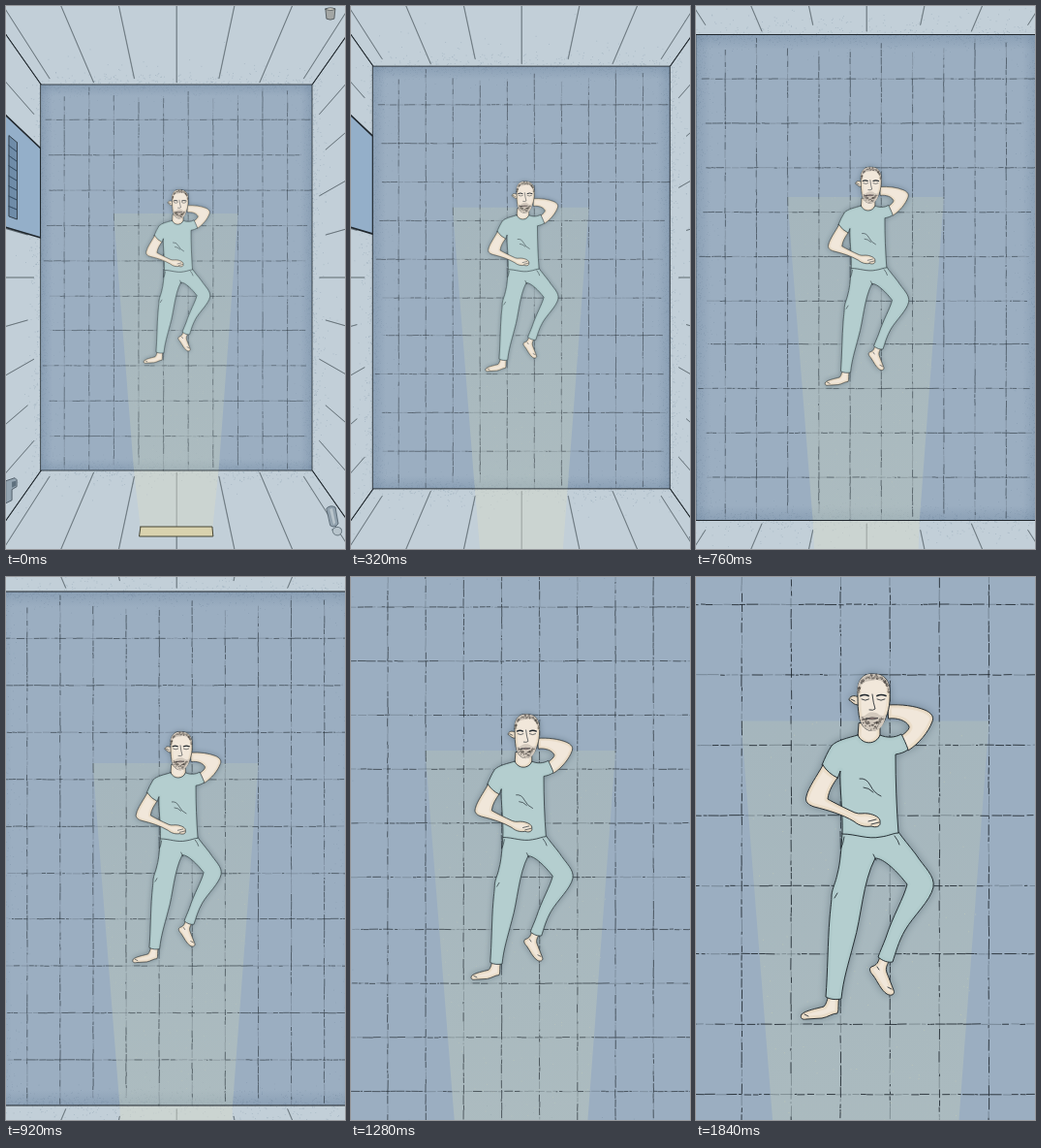
An HTML page with a canvas for the animation above (2.08 s loop, 350 by 560 pixels).

```html
<!DOCTYPE html>
<html lang="en">
<head>
<meta charset="utf-8">
<title>Cell zoom</title>
<style>
html, body { margin: 0; width: 100%; height: 100%; overflow: hidden; background: #c2cfd8; }
canvas { display: block; width: 350px; height: 560px; }
</style>
</head>
<body>
<canvas id="stage" width="350" height="560"></canvas>
<script>
const ctx = document.getElementById('stage').getContext('2d');
const LOOP = 2080, STEP = 40, LAST = 46;
const CX = 176, CY = 280;      // vanishing point
const HW = 140, HH = 199;      // half size of the floor
const SPEED = 0.01083;         // camera descent per step
const END = 1 / (1 - SPEED * LAST);
const INK = '#20272d';

let seed = 71;
function rand() {
  seed = (seed + 0x6D2B79F5) | 0;
  let t = Math.imul(seed ^ (seed >>> 15), 1 | seed);
  t = (t + Math.imul(t ^ (t >>> 7), 61 | t)) ^ t;
  return ((t ^ (t >>> 14)) >>> 0) / 4294967296;
}
const between = (a, b) => a + (b - a) * rand();

// Rough broken pen lines of the floor tiles
const bold = new Path2D(), faint = new Path2D();
function penLine(at, from, to, vertical) {
  let p = from;
  while (p < to) {
    const q = Math.min(to, p + between(.6, 6));
    const a = at + between(-.16, .16), b = a + between(-.1, .1);
    const path = rand() < .62 ? bold : faint;
    if (vertical) { path.moveTo(a, p); path.lineTo(b, q); }
    else { path.moveTo(p, a); path.lineTo(q, b); }
    p = q + between(.4, 1.7);
  }
}
for (let n = -4; n <= 5; n++) {
  const narrowRow = n > 1 ? 1.2 : 0;
  penLine(-13.4 + 25.6 * n, -HH + between(2, 16), HH - between(0, 8), true);
  penLine(-17.1 + 36.4 * n - narrowRow, -HW + between(2, 14), HW - between(0, 12), false);
}

// Stippled shade along the floor edges
const stipple = new Path2D();
for (let i = 0; i < 3000; i++) {
  const d = Math.min(26, -Math.log(1 - rand()) * 4.5);
  const side = rand() < .5 ? -1 : 1;
  if (rand() < .58) stipple.rect(side * (HW - d), between(-HH, HH), .5, .5);
  else stipple.rect(between(-HW, HW), side * (HH - d), .5, .5);
}

// Dust in the light
const dust = new Path2D();
for (let i = 0; i < 150; i++) {
  const v = rand(), half = 64 - 20 * v;
  dust.rect(between(-half, half), -66 + 265 * v, .5, .5);
}

// Grain on the walls, close to the floor
const grain = Array.from({ length: 1300 }, () => {
  const side = rand() < .5 ? -1 : 1, h = -Math.log(1 - rand()) * .03;
  return rand() < .6 ? [side * HW, between(-HH, HH), h] : [between(-HW, HW), side * HH, h];
});

// The sleeper
const P = d => new Path2D(d);
const SKIN = '#f1e7da', CLOTH = '#b4cecf';
const body = [
  [SKIN, P('M198 132C212 131 226 133 236 137C243 140 246 144 244 149C240 160 230 172 219 179L206 168C213 163 221 158 220 154C217 148 208 145 199 146Z')],
  [SKIN, P('M137 431C135 438 134 441 132 443C125 445 113 447 109 451C107 455 110 457 114 456L130 455C136 454 141 450 146 450C148 446 146 440 148 433Z')],
  [SKIN, P('M190 391C188 398 187 400 181 402C178 404 180 408 183 411C188 418 191 426 197 430C202 433 206 430 204 426L197 408C195 403 198 399 200 395Z')],
  [CLOTH, P('M151 264C150 280 149 295 146 306C144 316 141 320 140 328C140 334 139 340 138 352C136 376 136 408 134 433C139 436 145 436 150 435C152 415 157 400 163 377C171 350 172 315 185 290C194 290 208 304 218 317C215 330 203 350 196 372C193 380 190 386 188 392C193 396 198 398 203 397C206 388 209 376 216 364C224 350 242 334 245 320C247 308 236 300 227 286C220 277 214 270 209 263Z')],
  [SKIN, P('M168 151L167 165C173 174 184 174 190 164L190 151Z')],
  [CLOTH, P('M167 163C157 166 146 168 140 174C136 180 133 187 130 194C135 201 140 205 146 208L149 200C148 216 152 244 151 265C165 265 177 271 191 268C199 267 204 264 209 264C207 238 206 210 206 183C211 182 215 181 219 178C217 172 214 166 212 162C205 166 197 166 190 163C186 173 172 174 167 163Z')],
  [SKIN, P('M131 194C125 205 116 217 114 226C112 232 116 235 122 237C138 241 151 245 163 252C169 257 175 258 181 257C186 259 191 257 190 253C191 248 184 245 178 244C173 243 169 245 164 243C153 238 143 233 136 229C137 220 142 213 146 207Q137 203 131 194Z')],
  [SKIN, P('M168 124C163 121 158 123 158 127C161 128 162 132 168 132Z')],
  [SKIN, P('M167 119C166 105 174 99 183 100C195 100 200 107 200 119C201 131 198 143 193 151C188 160 177 161 172 153C167 146 167 132 167 119Z')]
];
const silhouette = new Path2D();
body.forEach(([, p]) => silhouette.addPath(p));
const hair = P('M167 122C165 107 173 99 182 100C194 99 201 107 200 122L197 113C195 107 190 107 186 106C180 108 172 106 169 114Z');
const beard = P('M169 143C172 145 174 143 177 141C180 139 186 139 189 142C192 144 195 143 196 141C196 150 190 159 183 159C174 159 169 150 169 143Z');
const brows = P('M170 122.5Q174 120.5 178 122.5M187 122.5Q191 120.5 196 122.5');
const face = P('M171 126Q175 128.5 178.5 126M187 126Q191 128.5 195 126M182 121Q183 130 185 136Q183 138 179 137M160 126L164 128');
const mouth = P('M176 146Q181 144 188 145.5Q183 148 176 146Z');
const folds = P('M169 208Q176 207 180 215T191 226M173 217Q178 217 183 222M153 268Q152 275 150 279M205 267Q209 272 210 276M183 286L186 292M178 252L186 250M181 255L189 253M112 451L116 453M198 423L202 425M146 326L143 331M187 402L189 405');
const curls = new Path2D();
function curl(x, y, r) {
  curls.moveTo(x + r, y);
  curls.arc(x, y, r, 0, between(3, 6));
}
for (let i = 0; i < 46; i++) {
  const a = between(3.1, 6.3);
  curl(183.5 + 15.5 * Math.cos(a), 119 + between(14, 19) * Math.sin(a), between(.5, 1.2));
}
for (let i = 0; i < 55; i++) {
  const a = between(.1, 3.04);
  curl(182.5 + between(6, 12) * Math.cos(a), 144 + between(6, 14) * Math.sin(a), between(.3, .7));
}

function fill(path, color) { ctx.fillStyle = color; ctx.fill(path); }
function stroke(path, color, width) {
  ctx.strokeStyle = color;
  ctx.lineWidth = width;
  ctx.stroke(path);
}

function softRim(path, color) {
  ctx.save();
  ctx.clip(path);
  stroke(path, color, 7);
  stroke(path, color, 3.5);
  ctx.restore();
}

function drawMan(scale) {
  ctx.save();
  ctx.scale(1 / END, 1 / END);
  ctx.translate(-CX, -CY);
  ctx.save();
  ctx.shadowColor = 'rgba(60,80,92,.5)';
  ctx.shadowBlur = 10 * scale / END;
  fill(silhouette, CLOTH);
  ctx.restore();
  for (const [color, path] of body) {
    fill(path, color);
    softRim(path, color === SKIN ? 'rgba(214,192,150,.22)' : 'rgba(160,190,190,.2)');
    stroke(path, INK, .95);
  }
  fill(hair, '#cdc4b9');
  fill(beard, '#d3c9bd');
  stroke(curls, 'rgba(50,46,44,.8)', .5);
  fill(mouth, '#a98d87');
  stroke(mouth, INK, .6);
  stroke(brows, INK, 1.7);
  stroke(face, INK, .85);
  stroke(folds, INK, .85);
  ctx.restore();
}

function edgeShade(x0, y0, x1, y1) {
  const g = ctx.createLinearGradient(x0, y0, x1, y1);
  g.addColorStop(0, 'rgba(105,130,156,.32)');
  g.addColorStop(1, 'rgba(105,130,156,0)');
  ctx.fillStyle = g;
  ctx.fillRect(-HW, -HH, 2 * HW, 2 * HH);
}

function drawFloor(scale) {
  ctx.save();
  ctx.translate(CX, CY);
  ctx.scale(scale, scale);
  ctx.fillStyle = '#9baec1';
  ctx.fillRect(-HW, -HH, 2 * HW, 2 * HH);
  edgeShade(-HW, 0, -HW + 12, 0);
  edgeShade(HW, 0, HW - 12, 0);
  edgeShade(0, -HH, 0, -HH + 12);
  edgeShade(0, HH, 0, HH - 12);
  fill(stipple, 'rgba(78,102,128,.32)');
  const light = ctx.createLinearGradient(0, -66, 0, HH);
  light.addColorStop(0, 'rgba(188,200,180,.3)');
  light.addColorStop(1, 'rgba(198,208,190,.4)');
  fill(P('M-65-66H63.5L43.5 199H-44Z'), light);
  fill(dust, 'rgba(214,215,180,.38)');
  stroke(bold, 'rgba(28,36,43,.85)', .5);
  stroke(faint, 'rgba(28,36,43,.4)', .36);
  ctx.strokeStyle = INK;
  ctx.lineWidth = .8;
  ctx.strokeRect(-HW, -HH, 2 * HW, 2 * HH);
  drawMan(scale);
  ctx.restore();
}

// Walls: x, y are floor units from the centre, h is height above the floor
function drawWalls(depth) {
  const zoom = h => 1 / Math.max(.12, depth - h);
  const at = (x, y, h) => [CX + x * zoom(h), CY + y * zoom(h)];
  function poly(points, color, line, width) {
    ctx.beginPath();
    points.forEach(p => ctx.lineTo(...at(...p)));
    ctx.closePath();
    if (color) { ctx.fillStyle = color; ctx.fill(); }
    if (line) { ctx.strokeStyle = line; ctx.lineWidth = width; ctx.stroke(); }
  }
  function seam(x, y, from, color, width) {
    poly([[x, y, from], [x, y, depth - .3]], null, color, width);
  }
  function prop(x, y, h, draw) {
    if (depth - h < .2) return;
    const k = zoom(h) * (1 - h);
    ctx.save();
    ctx.translate(...at(x, y, h));
    ctx.scale(k, k);
    draw();
    ctx.restore();
  }

  ctx.fillStyle = 'rgba(105,128,150,.35)';
  for (const g of grain) ctx.fillRect(...at(...g), .8, .8);

  const thin = 'rgba(38,48,56,.65)';
  for (const side of [-1, 1]) {
    for (let n = -3; n <= 3; n++) seam(n * 42.4, side * HH, n % 2 ? .03 : .01, thin, .55);
    for (let n = -4; n <= 4; n++) seam(side * HW, n * 40, n % 2 ? .09 : .05, thin, .55);
    seam(HW * side, -HH, 0, INK, .9);
    seam(HW * side, HH, 0, INK, .9);
  }

  const wallX = -HW;
  poly([[wallX, -133, 0], [wallX, -133, .42], [wallX, -41, .42], [wallX, -41, 0]], '#94afc9', INK, 1.7);
  const near = .151, far = .191;
  poly([[wallX, -118.5, near], [wallX, -118.5, far], [wallX, -51, far], [wallX, -51, near]], '#6f8ca8', INK, .8);
  for (let n = 1; n < 8; n++) {
    const y = -118.5 + n * 67.5 / 8;
    poly([[wallX, y, near], [wallX, y, far]], null, '#344b60', .7);
  }

  poly([[-44, HH, 0], [43.5, HH, 0], [29, HH, .2257], [-29, HH, .2257]], 'rgba(213,218,204,.5)');
  poly([[-29, HH, .2257], [28.6, HH, .2257], [28.2, HH, .2547], [-28.4, HH, .2547]], '#d9d2ae', '#454535', 1);

  prop(116.3, -HH, .268, () => {
    const pail = P('M-5-5L-4 5Q0 7 4 5L5-5Z'), rim = P('M-5-5Q0-8 5-5Q0-2-5-5Z');
    fill(pail, '#a3a6a4');
    stroke(pail, '#454c50', .8);
    fill(rim, '#c9c9c1');
    stroke(rim, '#454c50', .7);
  });
  prop(-HW, 181, .176, () => {
    const sink = P('M-6-10L3-13L5-11V-4L0-1V10L-6 13Z');
    fill(sink, '#94a5b2');
    stroke(sink, '#3d4a55', .8);
    fill(P('M0-9L4-10V-5L0-3Z'), '#5d6f7d');
  });
  prop(129, HH, .204, () => {
    const tank = P('M-7-12Q-3-16 2-13L5 4Q1 9-3 6Z');
    const bowl = P('M-1 10Q3 5 8 9Q10 14 5 16Q-1 16-1 10Z');
    fill(tank, '#91a1ad');
    stroke(tank, '#4a5964', .8);
    fill(P('M-4-11L-1-12L2 3L0 5Z'), '#b9c5cc');
    fill(bowl, '#b7c4cc');
    stroke(bowl, '#53626d', .8);
  });
}

function render(now) {
  const step = Math.min(LAST, Math.floor((now % LOOP) / STEP));
  const depth = 1 - SPEED * step;
  ctx.fillStyle = '#c2cfd8';
  ctx.fillRect(0, 0, 350, 560);
  if (HH / depth < CY) drawWalls(depth);
  drawFloor(1 / depth);
}

ctx.lineJoin = ctx.lineCap = 'round';
const start = performance.now();
function tick() {
  render(performance.now() - start);
  requestAnimationFrame(tick);
}
tick();
</script>
</body>
</html>
```
